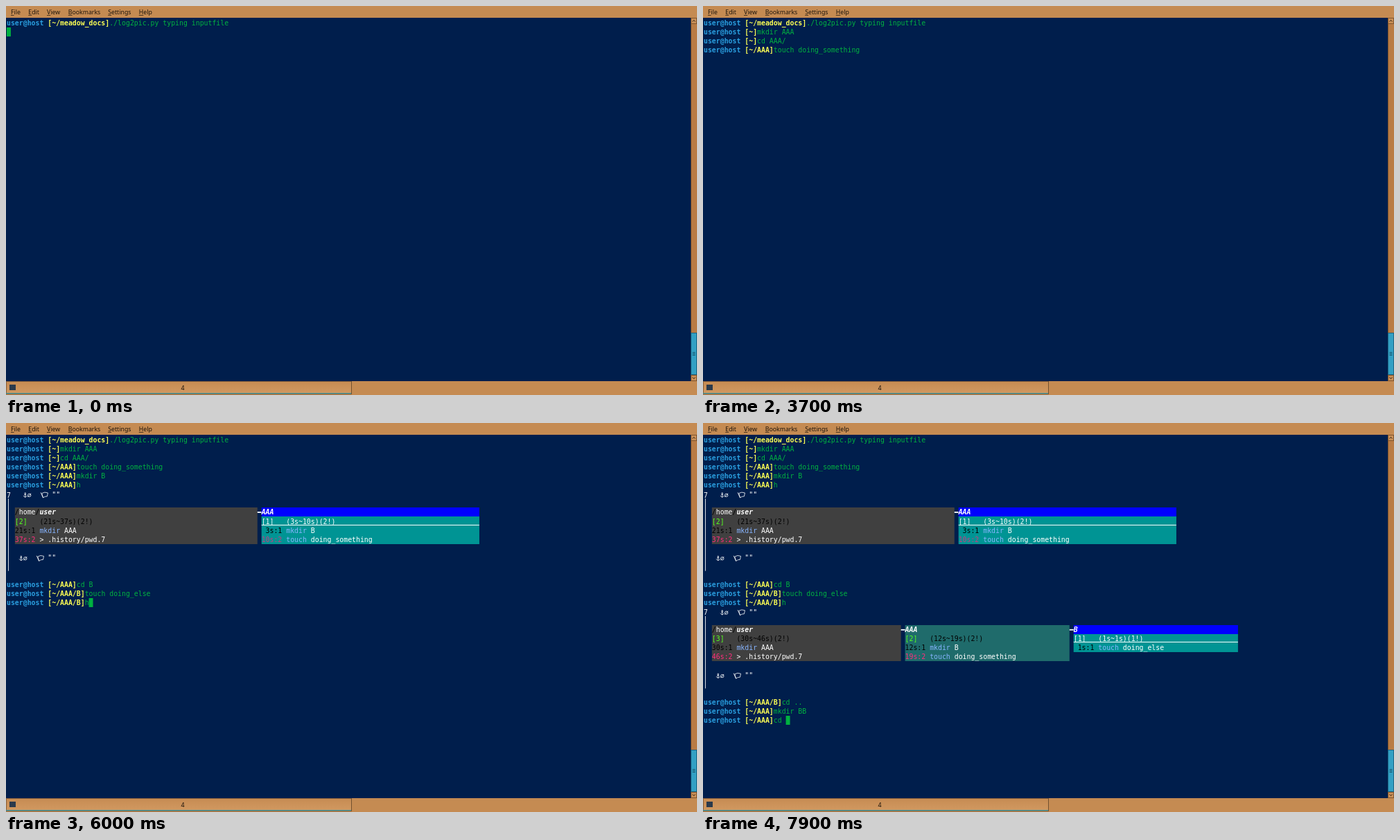
An HTML page with a canvas that plays this animation: 997 by 562 pixels, repeating every 8 s.

```html
<!DOCTYPE html>
<html lang="en">
<head>
<meta charset="utf-8">
<title>Terminal session</title>
<style>
  html, body { margin: 0; width: 100%; height: 100%; overflow: hidden; background: #001e4c; }
  canvas { display: block; }
</style>
</head>
<body>
<canvas id="stage" width="997" height="562"></canvas>
<script>
const ctx = document.getElementById('stage').getContext('2d');
const LOOP = 8000, STEP = 100;
const CELL_W = 5.93, CELL_H = 13.06, LEFT = 1, TOP = 17.8, BASELINE = 10.2;
const MONO = '9.85px "DejaVu Sans Mono", monospace';
const UI = '8.75px "Noto Sans", sans-serif';
const C = {
  bg: '#001e4c', green: '#00b140', host: '#2a9fe0', path: '#fdfd54', white: '#fff', black: '#000',
  grey: '#404040', blue: '#0000ff', teal: '#009494', deepTeal: '#1f6b6b',
  pink: '#ff2d7d', lime: '#55ff20', command: '#87b4ff', bar: '#c58b52', ink: '#1c140c'
};

const colX = col => LEFT + col * CELL_W;
const rowY = row => TOP + row * CELL_H;
const countTo = n => Array.from({ length: n + 1 }, (_, i) => i);

// keys: characters visible after each step; a negative count hides the cursor.
const commands = [
  { row: 0, dir: '~/meadow_docs', at: 0, text: './log2pic.py typing inputfile', keys: [-29] },
  { row: 1, dir: '~', at: 100, text: 'mkdir AAA', keys: [...countTo(4), -5, -5, -9] },
  { row: 2, dir: '~', at: 900, text: 'cd AAA/', keys: [...countTo(4), 7, -7] },
  { row: 3, dir: '~/AAA', at: 1600, text: 'touch doing_something', keys: [...countTo(20), -21] },
  { row: 4, dir: '~/AAA', at: 3800, text: 'mkdir B', keys: [...countTo(6), -7] },
  { row: 5, dir: '~/AAA', at: 4600, text: 'h', keys: [0, 1, -1] },
  { row: 16, dir: '~/AAA', at: 4900, text: 'cd B', keys: [...countTo(3), -4] },
  { row: 17, dir: '~/AAA/B', at: 5400, text: 'touch doing_else', keys: [0, 2, 5, 11, -16] },
  { row: 18, dir: '~/AAA/B', at: 5900, text: 'h', keys: [0, 1, -1] },
  { row: 29, dir: '~/AAA/B', at: 6100, text: 'cd ..', keys: [0, 1, -2, -2, -5] },
  { row: 30, dir: '~/AAA', at: 6600, text: 'mkdir BB', keys: [...countTo(8), -8] },
  { row: 31, dir: '~/AAA', at: 7600, text: 'cd ', keys: countTo(3) }
];

// Panel entries: [age, command, argument]
const reports = [
  { row: 6, at: 4800, fullAt: 4900, panels: [
    { from: 2, to: 61, name: '/home/user', fill: C.grey, count: '[2]', span: '(21s~37s)(2!)',
      entries: [['21s:1', 'mkdir', 'AAA'], ['37s:2', '>', '.history/pwd.7']] },
    { from: 62, to: 115, name: 'AAA', fill: C.teal, current: true, count: '[1]', span: '(3s~10s)(2!)',
      entries: [[' 3s:1', 'mkdir', 'B'], ['10s:2', 'touch', 'doing_something']] }
  ] },
  { row: 19, at: 6100, fullAt: 6100, panels: [
    { from: 2, to: 48, name: '/home/user', fill: C.grey, count: '[3]', span: '(30s~46s)(2!)',
      entries: [['30s:1', 'mkdir', 'AAA'], ['46s:2', '>', '.history/pwd.7']] },
    { from: 49, to: 89, name: 'AAA', fill: C.deepTeal, count: '[2]', span: '(12s~19s)(2!)',
      entries: [['12s:1', 'mkdir', 'B'], ['19s:2', 'touch', 'doing_something']] },
    { from: 90, to: 130, name: 'B', fill: C.teal, current: true, count: '[1]', span: '(1s~1s)(1!)',
      entries: [[' 1s:1', 'touch', 'doing_else']] }
  ] }
];

function box(x, y, w, h, color) {
  ctx.fillStyle = color;
  ctx.fillRect(x, y, w, h);
}

function write(text, col, row, color, style = '', dy = 0) {
  ctx.font = `${style} ${MONO}`;
  ctx.fillStyle = color;
  ctx.fillText(text, colX(col), rowY(row) + BASELINE + dy);
}

function cells(from, to, row, color) {
  const y = Math.round(rowY(row));
  box(colX(from), y, (to - from) * CELL_W, Math.round(rowY(row + 1)) - y, color);
}

function drawCommand({ row, dir, at, text, keys }, time) {
  const count = keys[Math.min(Math.floor((time - at) / STEP), keys.length - 1)];
  const typed = text.slice(0, Math.abs(count));
  const start = 12 + dir.length;
  write('user@host', 0, row, C.host, 'bold');
  write(`[${dir}]`, 10, row, C.path, 'bold');
  write(typed, start, row, C.green);
  return count < 0 ? null : [start + count, row];
}

function drawSymbols(col, row) {
  const x = colX(col), y = rowY(row) + 1.2;
  ctx.strokeStyle = C.white;
  ctx.lineWidth = 0.8;
  ctx.beginPath();
  // anchor
  ctx.arc(x + 3, y + 4.2, 0.8, 0, 7);
  ctx.moveTo(x + 3, y + 5); ctx.lineTo(x + 3, y + 10);
  ctx.moveTo(x + 1.5, y + 6); ctx.lineTo(x + 4.5, y + 6);
  ctx.moveTo(x + 0.4, y + 7.6); ctx.quadraticCurveTo(x + 3, y + 12, x + 5.6, y + 7.6);
  // crossed circle
  ctx.moveTo(x + 11.2, y + 7); ctx.arc(x + 9, y + 7, 2.2, 0, 7);
  ctx.moveTo(x + 6.6, y + 9.6); ctx.lineTo(x + 11.4, y + 4.4);
  ctx.stroke();
  // flag
  ctx.beginPath();
  ctx.moveTo(x + 25.4, y + 3);
  ctx.lineTo(x + 28.8, y + 10.6);
  ctx.quadraticCurveTo(x + 31.5, y + 8.3, x + 34.7, y + 8.6);
  ctx.lineTo(x + 35.7, y + 3.6);
  ctx.quadraticCurveTo(x + 31, y + 1.6, x + 27, y + 4.2);
  ctx.lineTo(x + 28.8, y + 10.6);
  ctx.stroke();
  write('""', col + 7, row, C.white, '', 0.6);
}

function drawHeading({ from, to, name, fill, current }, row) {
  cells(from, to, row, current ? C.blue : fill);
  const parts = name.split('/');
  let col = from;
  parts.forEach((part, i) => {
    const last = i === parts.length - 1;
    write(part, col, row, C.white, last ? 'italic bold' : '');
    col += part.length;
    if (!last) write('/', col++, row, C.black);
  });
  if (from > 2) box(colX(from - 1), rowY(row) + 5.8, CELL_W, 1.8, C.white);
}

function drawEntries({ from, to, fill, current, count, span, entries }, row) {
  for (let i = 0; i <= entries.length; i++) cells(from, to, row + i, fill);
  write(count, from, row, current ? C.white : C.lime);
  write(span, from + 6, row, current ? C.white : C.black);
  if (current) box(colX(from), Math.round(rowY(row) + 11.3), (to - from) * CELL_W, 1, C.white);
  entries.forEach(([age, command, argument], i) => {
    const y = row + 1 + i;
    write(age, from, y, i ? (current ? '#c83c82' : C.pink) : C.black);
    write(command, from + 6, y, command === '>' ? C.white : C.command);
    write(argument, from + 7 + command.length, y, C.white);
  });
}

function drawReport({ row, fullAt, panels }, time) {
  const full = time >= fullAt;
  write('7', 0, row, C.white, '', 1.2);
  drawSymbols(4, row);
  box(3, rowY(row + 1), 1, (full ? 8 : 2) * CELL_H, '#d5dae3');
  panels.forEach(panel => {
    drawHeading(panel, row + 2);
    if (full) drawEntries(panel, row + 3);
  });
  if (full) drawSymbols(3, row + 7);
}

function chevron(x, y, dir) {
  ctx.strokeStyle = C.ink;
  ctx.lineWidth = 0.9;
  ctx.beginPath();
  ctx.moveTo(x - 2, y + dir);
  ctx.lineTo(x, y - dir);
  ctx.lineTo(x + 2, y + dir);
  ctx.stroke();
}

function drawWindow() {
  box(0, 0, 997, 562, C.bg);
  box(0, 0, 997, 17, C.bar);
  ctx.font = UI;
  [['File', 7], ['Edit', 32.3], ['View', 59], ['Bookmarks', 89.8], ['Settings', 147.2], ['Help', 191.8]]
    .forEach(([label, x]) => {
      ctx.fillStyle = C.ink;
      ctx.fillText(label, x, 12);
      box(x, 13, ctx.measureText(label[0]).width, 0.7, C.ink);
    });

  // scroll bar
  box(988, 17, 9, 525, '#b97c45');
  box(988, 17, 1, 525, '#7d542f');
  [17, 533].forEach(y => {
    box(988, y, 9, 9, '#80552e');
    box(989, y + 1, 7, 7, '#c98f57');
  });
  chevron(992.5, 21.5, 1);
  chevron(992.5, 537.5, -1);
  box(988, 472, 9, 61, '#1c6585');
  box(989, 473, 7, 59, '#32a0c4');
  for (let y = 500; y < 506; y += 2) box(990.5, y, 4, 1, '#17576f');

  // tab bar
  box(0, 542, 997, 20, C.bar);
  const shade = ctx.createLinearGradient(0, 543, 0, 559);
  shade.addColorStop(0, '#c78c53');
  shade.addColorStop(1, '#d09860');
  box(0, 543, 498, 16, shade);
  box(0, 542, 498, 1, '#87603c');
  box(0, 542, 1, 19, '#87603c');
  box(498, 542, 1, 19, '#71502f');
  box(0, 559, 498, 1.5, '#3b98a4');
  box(0, 560.5, 498, 0.7, '#71502f');
  box(5, 547, 9, 8, '#2b3a4c');
  ctx.font = UI;
  ctx.fillStyle = C.ink;
  ctx.fillText('4', 252.6, 555);
}

function draw(time) {
  drawWindow();
  let cursor = null;
  commands.filter(c => time >= c.at).forEach(c => { cursor = drawCommand(c, time); });
  reports.filter(r => time >= r.at).forEach(r => drawReport(r, time));
  if (time < STEP) cursor = [0, 1];
  if (cursor) cells(cursor[0], cursor[0] + 1, cursor[1], C.green);
}

const startTime = performance.now();
function tick() {
  draw((performance.now() - startTime) % LOOP);
  requestAnimationFrame(tick);
}
tick();
</script>
</body>
</html>
```
